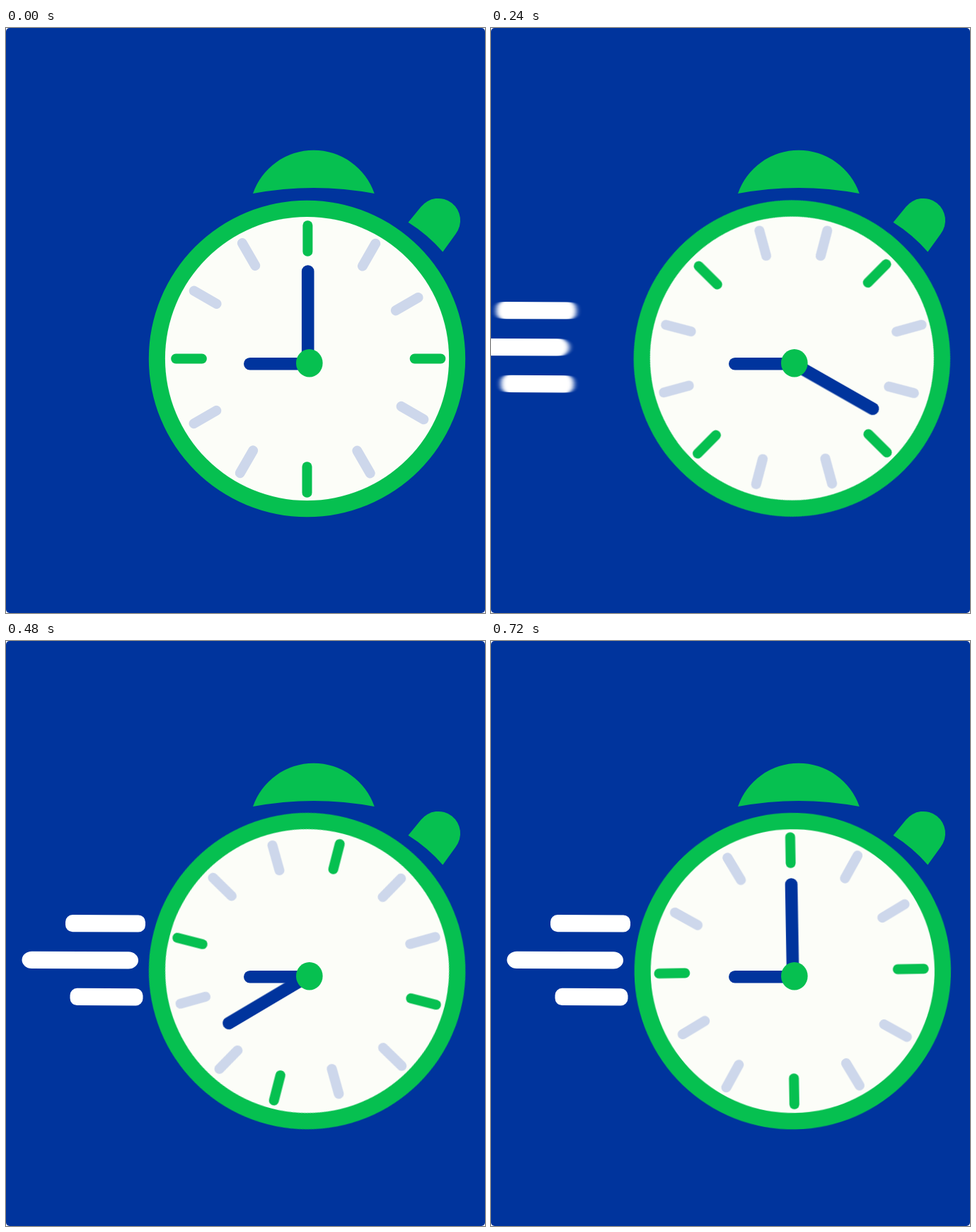
These frames come from a looping animation (677x827 px, 0.76 s). An HTML page:

```html
<!DOCTYPE html>
<html lang="en">
<head>
<meta charset="utf-8">
<title>Speeding clock</title>
<style>
  :root { --blue: #00349d; --green: #06c050; --grey: #cdd7eb; --face: #fcfdf8; }
  html, body { margin: 0; width: 100%; height: 100%; overflow: hidden; background: #fff; }
  svg { display: block; width: 677px; height: 827px; }

  /* 19 poses of 40 ms; the tiny lead keeps steps clear of rounding */
  .dial, .minute, .speed { animation: 760ms -1ms infinite; }
  .dial { animation-name: dial; transform-origin: 425.9px 467.1px; }
  .minute { animation-name: minute; animation-timing-function: steps(19); transform-origin: 426.7px 474px; }
  .speed { animation-name: dash, smear; }

  @keyframes dial {
    0% { transform: rotate(0deg); animation-timing-function: steps(9); }
    47.368% { transform: rotate(67.1deg); animation-timing-function: steps(10); }
    100% { transform: rotate(191.4deg); }
  }
  @keyframes minute {
    to { transform: rotate(378.94deg); }
  }
  @keyframes dash {
    0% { transform: translateX(-229.5px); animation-timing-function: steps(9); }
    47.368%, 100% { transform: translateX(0); }
  }
  @keyframes smear {
    0%, 47.36% { filter: url(#smear); }
    47.368%, 100% { filter: none; }
  }

  .green { fill: var(--green); }
  .grey { fill: var(--grey); }
  .hand { stroke: var(--blue); stroke-width: 17.6; stroke-linecap: round; }
</style>
</head>
<body>
<svg viewBox="0 0 677 827">
  <defs>
    <filter id="smear" x="-20%" width="140%"><feGaussianBlur stdDeviation="3.7 0"/></filter>
  </defs>
  <rect width="677" height="827" rx="5" fill="var(--blue)"/>

  <g class="speed" fill="#fff">
    <rect x="84" y="387.2" width="113" height="24.2" rx="10" transform="rotate(.25 140 399)"/>
    <rect x="22.5" y="439" width="164.5" height="24.3" rx="14" ry="12.1" transform="rotate(.25 105 451)"/>
    <rect x="90.5" y="491" width="103" height="24.3" rx="10" transform="rotate(.25 142 503)"/>
  </g>

  <path class="green" d="M349 234A90.8 90.8 0 0 1 520.7 234A463 463 0 0 0 349 234Z"/>
  <path class="green" d="M568.5 274.8L586.5 252.8A31 31 0 0 1 635.5 291.2L617.3 316.5Q596 292 568.5 274.8Z"/>

  <g class="dial">
    <circle class="green" cx="425.5" cy="467.5" r="223.7"/>
    <circle cx="425.5" cy="467.5" r="200.6" fill="var(--face)"/>
    <g id="ticks" transform="translate(425.5 467.5)"></g>
  </g>

  <path class="hand" d="M344.8 474.8H426"/>
  <path class="hand minute" d="M426.7 474V344"/>
  <ellipse class="green" cx="428.8" cy="473.7" rx="18.8" ry="19.8"/>
</svg>
<script>
  // Angle and radius of each slightly uneven hour mark
  const marks = [
    [0.3, 170], [30.8, 171], [61.3, 161], [90, 170.5],
    [117.2, 167.5], [151.3, 166.5], [180, 171], [210.4, 169],
    [240.2, 166], [270, 167], [301.1, 168], [330.8, 169]
  ];
  const ticks = document.getElementById('ticks');

  marks.forEach(([angle, radius], hour) => {
    const tick = document.createElementNS(ticks.namespaceURI, 'rect');
    const attrs = {
      class: hour % 3 ? 'grey' : 'green',
      x: -7, y: -25.3, width: 14, height: 50.6, rx: 6.8,
      transform: `rotate(${angle}) translate(0 ${-radius}) rotate(${hour * 30 - angle})`
    };
    for (const name in attrs) tick.setAttribute(name, attrs[name]);
    ticks.append(tick);
  });
</script>
</body>
</html>
```
